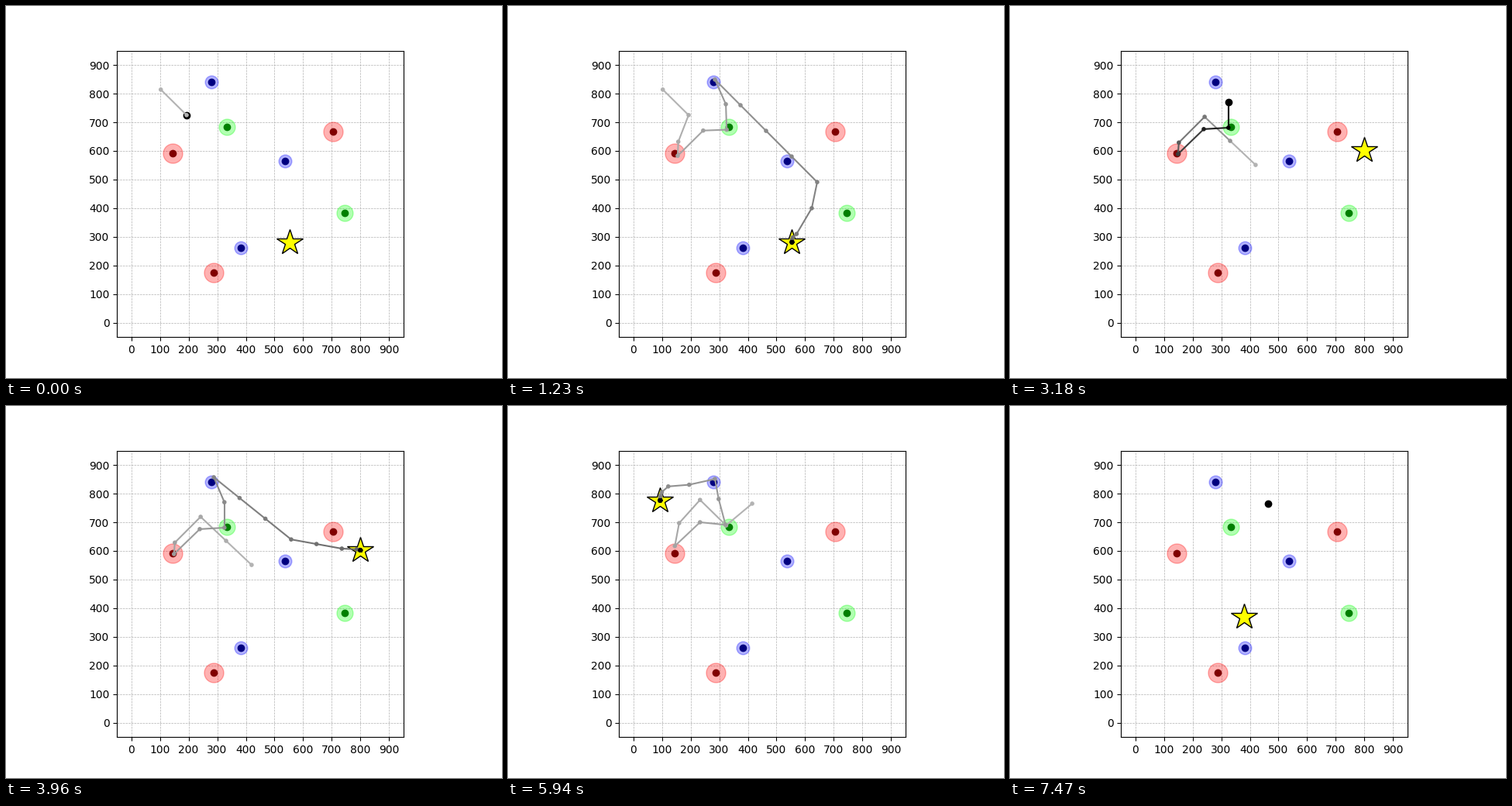
Animation of 640 by 480 pixels, one loop 7.5 s. Source, as a matplotlib script:

```python
import math
import numpy as np
import matplotlib.pyplot as plt
from matplotlib.animation import FuncAnimation
from matplotlib.collections import LineCollection

STEPS = 50
FRAMES = 250
REACH = 93                      # longest move along either axis
PULL = np.array([0.8, 0.4])     # share of the gap closed per step near the goal

# halo colour, core colour, halo size, positions
ZONES = [
    ("red", "maroon", 18, [(145, 591), (705, 667), (287.5, 174.5)]),
    ("lime", "green", 15, [(333.5, 684), (744, 383)]),
    ("blue", "navy", 12, [(279, 840), (537.5, 564), (382, 261)]),
]

# goal, then the corners of the route towards it
ROUTES = [
    ((554, 281), [(103, 814), (193, 725), (157, 632), (155, 583), (244, 671),
                  (326, 674), (323, 763), (285, 849), (642, 491), (623, 400),
                  (570, 310)]),
    ((91.5, 820), [(106, 470), (179, 562), (139, 626), (228, 711), (317, 695),
                   (296, 783), (290, 851), (201, 870), (122, 859)]),
    ((800, 602), [(420, 551), (242, 719), (152, 629), (149, 589), (239, 676),
                  (325, 681), (325, 770), (288, 857), (558, 640), (735, 608)]),
    ((94, 776), [(415, 765), (324, 689), (233, 778), (160, 697), (145, 617),
                 (233, 700), (322, 691), (298, 781), (285, 851), (195, 831),
                 (122, 825)]),
    ((560, 600), [(470, 70), (300, 160), (326, 690), (318, 775), (288, 854),
                  (540, 625)]),
    ((381, 370), [(463.5, 765)]),
]


def walk(goal, corners):
    """Even moves between corners, then an easing approach to the goal."""
    pts = [np.array(corners[0], float)]
    for corner in corners[1:]:
        start, gap = pts[-1], np.array(corner) - pts[-1]
        moves = math.ceil(abs(gap).max() / REACH)
        pts += [start + gap * (i + 1) / moves for i in range(moves)]
    while len(pts) < STEPS:
        pts.append(pts[-1] + PULL * (np.array(goal) - pts[-1]))
    return np.array(pts)


WALKS = [walk(*route) for route in ROUTES]

fig, ax = plt.subplots(figsize=(6.4, 4.8), dpi=100)
ax.set_aspect("equal")
ax.set(xlim=(-50, 950), ylim=(-50, 950),
       xticks=range(0, 1000, 100), yticks=range(0, 1000, 100))
ax.grid(linestyle="--", linewidth=0.5)

for halo, core, size, spots in ZONES:
    for x, y in spots:
        ax.plot(x, y, "o", color=halo, ms=size, alpha=0.3)
        ax.plot(x, y, "o", color=core, ms=6)

agent, = ax.plot([], [], "o", color="black", ms=6)
star, = ax.plot([], [], "*", ms=25, mfc="yellow", mec="black")
trail = LineCollection([], linewidths=1.5, capstyle="projecting", zorder=3)
ax.add_collection(trail, autolim=False)
dots = ax.scatter([], [], s=9, linewidths=1, zorder=4)


def update(frame):
    episode, step = divmod(frame + 1, STEPS)
    pts = WALKS[episode][:step + 1]
    goal = ROUTES[episode][0]

    star.set_data(goal[:1], goal[1:])
    agent.set_data(pts[-1:, 0], pts[-1:, 1])

    if step == 0:
        trail.set_segments([])
        dots.set_offsets(np.empty((0, 2)))
    else:
        # the trail darkens towards the newest step
        shades = [str(g) for g in np.linspace(0.7, 0, step)]
        trail.set_segments(np.stack([pts[:-1], pts[1:]], axis=1))
        trail.set_color(shades)
        dots.set_offsets(pts)
        dots.set_color(shades + shades[-1:])
    return agent, star, trail, dots


anim = FuncAnimation(fig, update, frames=FRAMES, init_func=lambda: update(0),
                     interval=30, repeat=True, repeat_delay=0)
plt.show()
```
